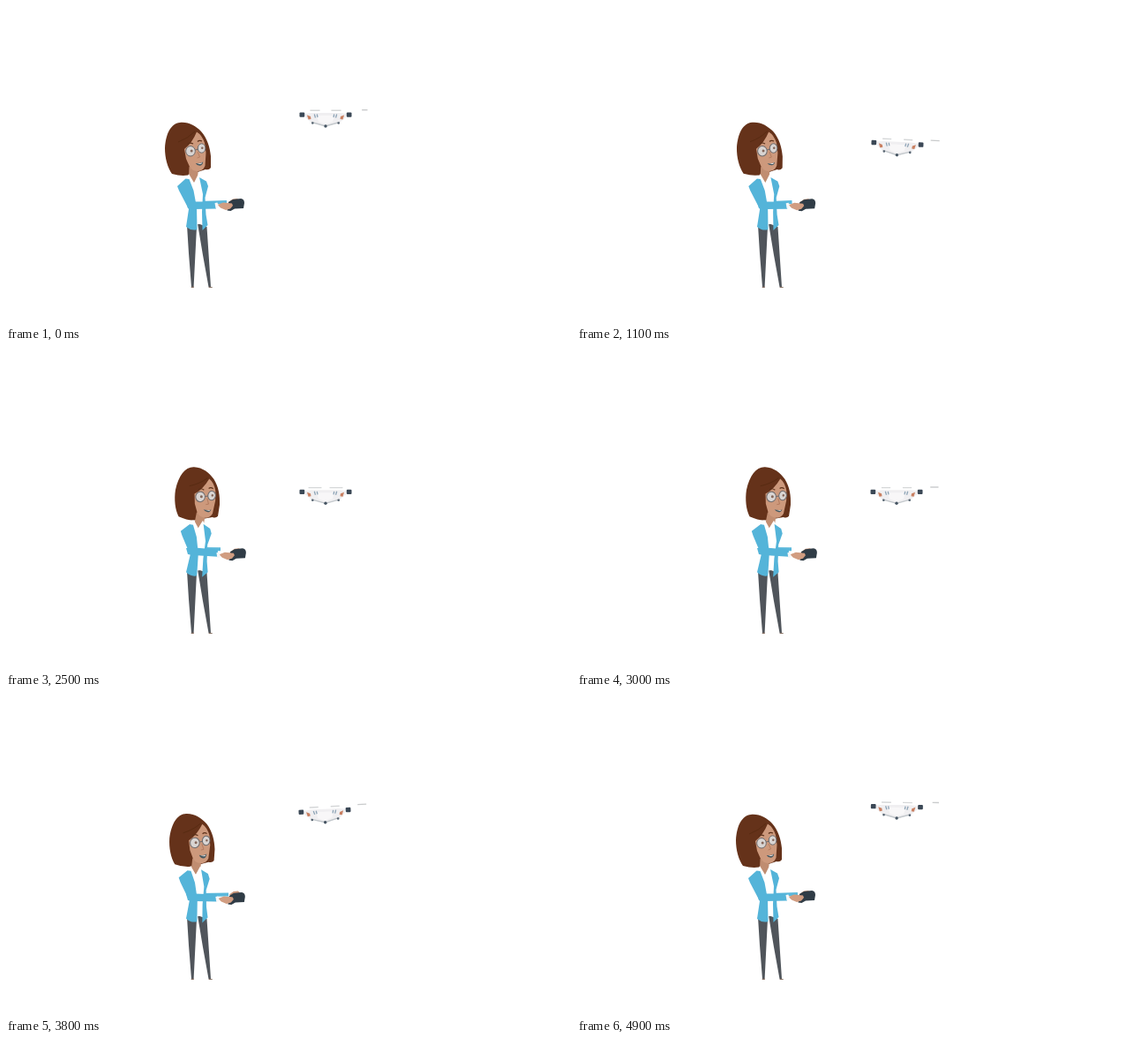
Recreate the animation shown at these times as an HTML page. Size 640x360 px, loop 5 s.

```html
<!DOCTYPE html>
<html lang="en">
<head>
<meta charset="utf-8">
<title>Flying a drone</title>
<style>
  html, body { margin: 0; width: 100%; height: 100%; overflow: hidden; background: #fff; }
  svg { display: block; width: 100vw; height: 100vh; }
</style>
</head>
<body>
<svg viewBox="0 0 640 360">
  <g id="legs">
    <path fill="#50555b" d="M205 248L216 250 212.600 318H210L207 280ZM217 246L227.500 250 232 318H229.500L223 282Z"/>
    <path fill="#8a7467" d="M209.300 319Q210 317 212.800 317.500V319ZM229.300 319Q230 317 234 318.500V319Z"/>
  </g>

  <path id="farArm" fill="none" stroke="#5bb8db" stroke-width="4"/>

  <g id="head">
    <path fill="#65321a" d="M197 132C207 131 215 136 221 142C228 150 231 160 232 170L232 183Q230 186 226 185L211 190Q202 194 188 190C183 183 180 172 180 161C181 144 187 133 197 132Z"/>
    <path fill="#c08d71" d="M207.500 182L217.500 185 217.500 194 213 201 207 193Z"/>
    <path fill="#cd997c" d="M216 142.500Q222 146 225 155L226.500 166 225.500 181Q223 187 217 187Q211 187 208 182L204 173 202 162Q211 155 216 142.500Z"/>
    <path fill="none" stroke="#53290f" stroke-width=".7" d="M214 142Q206 150 195 154"/>
    <path fill="none" stroke="#5b3019" stroke-width="1.200" d="M205.500 156.500Q208 154 212 156M217 153.500Q219 151.500 222 153"/>
    <g fill="#d9d5d3" stroke="#6d6a6c">
      <ellipse cx="209" cy="164.300" rx="5.300" ry="5.700"/>
      <ellipse cx="221.600" cy="161" rx="4.300" ry="5.200"/>
      <path fill="none" d="M214.300 163L217.500 162"/>
    </g>
    <g fill="#85675a">
      <circle cx="210.200" cy="164" r="1.500"/>
      <circle cx="222.300" cy="160.700" r="1.300"/>
    </g>
    <path fill="none" stroke="#b27a5e" stroke-width=".9" d="M217 165L219.500 171 216.500 172"/>
    <g id="mouth">
      <path fill="#45565e" d="M-4.200 -.6Q0 .2 4.200 -2Q3.800 1.800 .8 2.200Q-2.600 2.300 -4.200 -.6Z"/>
      <path fill="#f4efec" d="M-2.800 -.3Q.5 .3 3.400 -1.200L2.600 .1Q0 .9 -2.800 -.3Z"/>
    </g>
  </g>

  <g id="torso">
    <path fill="#fff" d="M205 196L207 190 213 200 218 190 221 195 224 212 222 246 213 248Z"/>
    <path fill="#54b4d9" d="M203.500 195.500L207.500 196 212.500 209 216 228 216.500 253Q210 255 204 250L207 230 196 209 194 204Z"/>
    <path fill="#54b4d9" d="M219 194L227 198.500 229 204 225.500 217 226.500 236 228.500 248 222.500 254 222 233 223 213Z"/>
  </g>

  <path id="sleeve" fill="#54b4d9"/>
  <g id="hands">
    <path id="farHand" fill="#c99679" d="M252 222L257 218.500 262 218 266 221.500 258 225Z"/>
    <path fill="#303c46" d="M252 222L257 219 266 218Q270 218.500 270 223L269 229 259 229.500 254.500 232 250.500 231.500Z"/>
    <path fill="#d19d81" d="M239.500 225L246 222.500 256 223.500 257 226 254 229.500 249 231 243 228.500Z"/>
    <path fill="#f6f7f8" d="M236.500 223L239.500 222.500 241 228 237.500 229Z"/>
  </g>

  <g id="drone">
    <path fill="#f0eff1" d="M338 122L346 121 378 121 386 122 385 126 378 132 362 136.500 346 132 339 126Z"/>
    <path fill="#f8f7f8" d="M352 124H372L370 131 362 134 354 131Z"/>
    <path fill="none" stroke="#c3c8cc" stroke-width="1.400" d="M346 131.500L362 136 378 131.500"/>
    <g id="side">
      <rect x="332.500" y="120.500" width="5.700" height="5.300" rx="1" fill="#3b4856"/>
      <path fill="#c98062" d="M341 123.500L345 125 345.500 128 342.500 128.500Z"/>
      <path fill="none" stroke="#8ea4b6" stroke-width="1.300" d="M349.300 122.500L350.500 126.500M352.300 122.500L353 126"/>
      <circle cx="347.300" cy="132.500" r="1.300" fill="#566370"/>
    </g>
    <use href="#side" transform="matrix(-1 0 0 1 724 0)"/>
    <circle cx="362" cy="136" r="1.700" fill="#455462"/>
    <path id="blades" fill="none" stroke="#d5d7d8" stroke-width="1.400"/>
    <path id="tip" fill="none" stroke="#c9cbcc" stroke-width="1.400"/>
  </g>
</svg>
<script>
const LOOP = 5000, STEP = 100;

const part = (t, a, b) => Math.min(1, Math.max(0, (t - a) / (b - a)));
const ease = (t, a, b) => { const u = part(t, a, b); return u * u * (3 - 2 * u); };
const bump = (t, a, b) => Math.sin(Math.PI * part(t, a, b)) ** 2;
const set = (id, name, value) => document.getElementById(id).setAttribute(name, value);

function draw(t) {
  const sink = ease(t, 600, 1200) - ease(t, 3300, 3950);
  const lift = bump(t, 3000, 4200);

  // She leans after the drone, with a little swing before and after.
  const lean = 8.6 * (ease(t, 950, 1700) - ease(t, 3450, 4100))
    + 2 * bump(t, 3100, 3700) - 2.2 * bump(t, 100, 1200);
  const hx = lean * .22, hy = lean * .5;
  set('head', 'transform', `rotate(${lean} 217 238)`);
  set('torso', 'transform', `rotate(${lean * .55} 212 250)`);
  set('mouth', 'transform', `translate(219 178.500) scale(1 ${1 + .4 * lift - .2 * sink})`);
  set('hands', 'transform', `translate(${hx} ${hy})`);
  set('farHand', 'transform', `translate(0 ${-2 * lift})`);

  const wrist = 238 + hx, top = 221.5 + hy * .5;
  set('sleeve', 'd', `M204 222L214 221.500 ${wrist} ${top}V${top + 8}L212 230 206 229Z`);
  set('farArm', 'd', `M220 223L${250 - 7 * sink + 4 * lift} ${222 + lean * .15}`);

  const tilt = 2.7 * bump(t, 700, 1500) - 3.2 * bump(t, 3200, 4200) + 2 * bump(t, 4600, 5000);
  set('drone', 'transform', `translate(${tilt * .3} ${35.3 * sink}) rotate(${tilt} 362 126)`);

  // Thirteen rotor turns in a loop.
  const turn = Math.cos((13 * t / LOOP + .14) * 2 * Math.PI);
  const w = 13 - 3 * turn;
  set('blades', 'd', [350, 374].map(x => `M${x - w / 2} 118.300h${w}`).join(''));
  set('tip', 'd', turn > 0 ? `M409.500 117.700h${-10 * turn}` : '');
}

function tick(now) {
  draw(Math.floor(now % LOOP / STEP) * STEP);
  requestAnimationFrame(tick);
}
draw(0);
requestAnimationFrame(tick);
</script>
</body>
</html>
```
